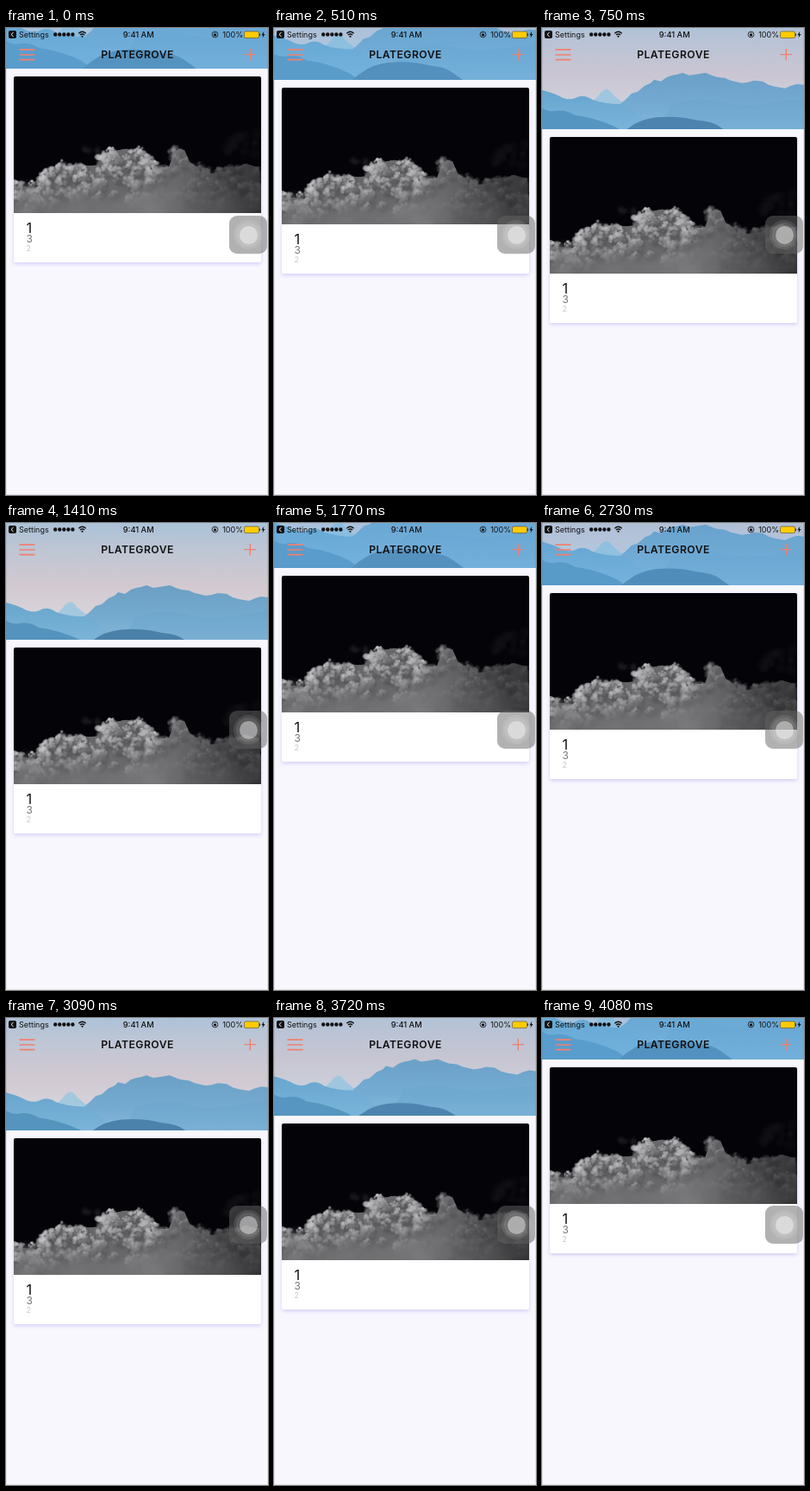
These frames come from a looping animation (304 by 540 pixels, 4.11 s). An HTML page with a canvas:

```html
<!DOCTYPE html>
<html lang="en">
<head>
<meta charset="utf-8">
<title>Stretching header</title>
<style>
  html, body { margin: 0; width: 100%; height: 100%; overflow: hidden; }
  body { position: relative; background: #f8f7fe; font-family: Inter, Roboto, sans-serif; }
  .header { position: absolute; left: 0; top: 0; width: 304px; height: 47px; overflow: hidden; }
  .scene { position: absolute; left: 0; bottom: -12px; display: block; }
  .tint { position: absolute; inset: 0; background: #62aae0; }
  .bar { position: absolute; left: 0; top: 0; }
  .lift { position: absolute; left: 0; top: 0; filter: drop-shadow(0 2px 2px rgba(112, 92, 225, .25)); }
  .card {
    position: absolute; left: 9px; top: 9px; width: 286.5px; height: 215px;
    background: #fff; border-radius: 2px; overflow: hidden;
  }
  .card canvas { display: block; width: 287px; height: 157.5px; }
  .card span { position: absolute; left: 14.5px; line-height: 1; }
  .one { top: 167px; font-size: 16.5px; color: #111; }
  .three { top: 181.5px; font-size: 12px; color: #777; }
  .two { top: 193.5px; font-size: 9px; color: #c9c9cc; }
  .touch {
    position: absolute; left: 259px; top: 217px; width: 44px; height: 44px;
    border-radius: 9px; background: rgba(100, 100, 100, .5);
  }
  .touch i { position: absolute; border-radius: 50%; background: rgba(255, 255, 255, .1); }
  .touch i:nth-child(1) { inset: 5px; }
  .touch i:nth-child(2) { inset: 8px; }
  .touch i:nth-child(3) { inset: 11.5px; background: rgba(255, 255, 255, .42); }
  .edge { position: absolute; inset: 0; border: 1px solid rgba(120, 120, 130, .18); border-top: 0; }
</style>
</head>
<body>
<div class="lift" id="lift">
  <div class="card">
    <canvas id="clouds" width="574" height="315"></canvas>
    <span class="one">1</span><span class="three">3</span><span class="two">2</span>
  </div>
</div>

<div class="header" id="header">
  <svg class="scene" id="scene" width="304" height="152" viewBox="0 -5 304 152">
    <defs>
      <linearGradient id="sky" x2="0" y2="1">
        <stop offset="0" stop-color="#a9c1d8"/>
        <stop offset=".25" stop-color="#c0c6d4"/>
        <stop offset=".5" stop-color="#d3c8d0"/>
        <stop offset=".7" stop-color="#d8d2d8"/>
      </linearGradient>
      <linearGradient id="far" x2="0" y2="1">
        <stop offset="0" stop-color="#6b9fc4"/>
        <stop offset=".5" stop-color="#76abd0"/>
        <stop offset="1" stop-color="#8abcdc"/>
      </linearGradient>
      <linearGradient id="left" x2="0" y2="1">
        <stop offset="0" stop-color="#68a5cd"/>
        <stop offset="1" stop-color="#80b8da"/>
      </linearGradient>
    </defs>
    <rect y="-5" width="304" height="152" fill="url(#sky)"/>
    <path d="M56 108L66 98Q75 85 82 97L98 110Z" fill="#a5c9de"/>
    <path d="M80 147L92 107L97 103L104 96L111 94L119 87L126 84L130 80L138 82L145 77L151 75L157 74L163 72L171 75L178 74L190 72L197 75L203 77L212 78L219 81L232 84L239 83L246 81L256 82L263 86L270 88L282 90L289 87L296 85L304 86V147Z" fill="url(#far)"/>
    <path d="M150 109Q180 98 206 105T258 108T304 102V147H130Z" fill="#659fc8" opacity=".3"/>
    <path d="M0 92Q13 95 24 101Q33 104 39 101Q48 96 58 103Q75 109 92 108Q110 116 140 147H0Z" fill="url(#left)"/>
    <path d="M0 113Q9 118 16 116Q27 114 38 121Q62 124 86 135L104 147H0Z" fill="#5493bd"/>
    <path d="M88 147Q96 138 102 135Q113 126 132 123.5Q158 121 181 127Q198 128 207 135L224 147Z" fill="#4a80a9"/>
  </svg>
  <div class="tint" id="tint"></div>
</div>

<svg class="bar" width="304" height="47" font-family="Inter, Roboto, sans-serif" fill="#111">
  <rect x="3" y="3" width="9" height="9" rx="2"/>
  <path d="M8.6 5L6 7.5L8.6 10" fill="none" stroke="#fff"/>
  <text x="15" y="11" font-size="9">Settings</text>
  <path d="M57.2 7.5H79" stroke="#111" stroke-width="4.4" stroke-linecap="round" stroke-dasharray="0 5.05"/>
  <g fill="none" stroke="#111" stroke-width="1.3">
    <path d="M84.3 6.2Q88.5 2.4 92.7 6.2M85.9 8.1Q88.5 5.8 91.1 8.1"/>
    <circle cx="242.5" cy="7.5" r="3.4" stroke-width=".8"/>
  </g>
  <circle cx="88.5" cy="9.8" r="1.1"/>
  <text x="153.7" y="11" font-size="9.3" font-weight="500" text-anchor="middle">9:41 AM</text>
  <rect x="241" y="7" width="3" height="2.3"/>
  <path d="M241.6 7.2V6.4a.9 .9 0 0 1 1.8 0v.8" fill="none" stroke="#111" stroke-width=".6"/>
  <text x="275" y="11" font-size="9" text-anchor="end">100%</text>
  <rect x="276.5" y="4" width="17" height="7.6" rx="1.5" fill="#fc0" stroke="#4d4933" stroke-width=".6"/>
  <path d="M294.4 6.4v2.8" stroke="#333"/>
  <path d="M299.4 3.8L296.4 8.2H298.2L297.5 11.5L300.5 7H298.7Z"/>
  <g stroke="#f0806e" stroke-width="1.7">
    <path d="M15.5 25.2h18M15.5 31h18M15.5 36.7h18"/>
    <path d="M276.5 30.6h13.5M283.3 24v13.4" stroke-width="1.4"/>
  </g>
  <text x="152.5" y="35.3" font-size="12.2" font-weight="600" letter-spacing=".45" text-anchor="middle">PLATEGROVE</text>
</svg>

<div class="touch"><i></i><i></i><i></i></div>
<div class="edge"></div>

<script>
const $ = id => document.getElementById(id);
const LOOP = 4110, REST = 46.5, PULL = 89;

let seed = 11;
const rand = () => (seed = seed * 16807 % 2147483647) / 2147483647;
const mix = (a, b, k) => a + (b - a) * Math.min(1, Math.max(0, k));

// Cloud skyline as x, y pairs in card units
const skyline = [0, 119, 12, 121, 22, 121, 30, 126, 36, 108, 44, 98, 57, 96, 67, 102,
  76, 94, 86, 97, 98, 96, 102, 83, 116, 80, 131, 77, 146, 82, 157, 92, 170, 99,
  181, 98, 184, 86, 191, 77, 199, 79, 203, 92, 214, 99, 218, 107, 234, 105, 255, 102,
  268, 94, 281, 98, 288, 98];

function topAt(x) {
  let i = 2;
  while (i < skyline.length - 2 && skyline[i] < x) i += 2;
  return mix(skyline[i - 1], skyline[i + 1], (x - skyline[i - 2]) / (skyline[i] - skyline[i - 2]));
}

function drawClouds() {
  const g = $('clouds').getContext('2d');
  const puff = (x, y, r, v, a) => {
    const rgb = `${v | 0},${v | 0},${v + 2 | 0}`;
    const p = g.createRadialGradient(x, y, 0, x, y, r);
    p.addColorStop(0, `rgba(${rgb},${a})`);
    p.addColorStop(.55, `rgba(${rgb},${a * .75})`);
    p.addColorStop(1, `rgba(${rgb},0)`);
    g.fillStyle = p;
    g.fillRect(x - r, y - r, r * 2, r * 2);
  };

  // A billow is a shaded ball of small puffs, lit from the upper left
  const billow = (x, y, r, light, dark, alpha) => {
    puff(x + r * .2, y + r * .3, r * 1.15, dark, alpha);
    for (let i = 0; i < 26; i++) {
      const angle = rand() * 6.283, d = Math.sqrt(rand()) * .85;
      const dx = Math.cos(angle) * d, dy = Math.sin(angle) * d;
      const lit = .45 - dx * .35 - dy * .65 + (rand() - .5) * .3;
      puff(x + dx * r, y + dy * r, r * (.18 + rand() * .24), mix(dark, light, lit), alpha * .75);
    }
  };

  g.scale(2, 2);
  g.fillStyle = '#040308';
  g.fillRect(0, 0, 287, 158);

  // Thin wisps above the bank
  for (let i = 0; i < 14; i++) {
    puff(82 + rand() * 16, 82 + rand() * 6, 3 + rand() * 3, 42, .18);
    puff(247 + rand() * 40, 66 + rand() * 24, 4 + rand() * 6, 40, .18);
  }

  const body = g.createLinearGradient(0, 0, 287, 0);
  body.addColorStop(0, '#646466');
  body.addColorStop(.65, '#6a6a6c');
  body.addColorStop(1, '#343437');
  g.beginPath();
  g.moveTo(0, 158);
  for (let x = 0; x <= 287; x += 3) g.lineTo(x, topAt(x) + 6);
  g.lineTo(287, 158);
  g.fillStyle = body;
  g.fill();

  const billows = Array.from({ length: 150 }, () => {
    const x = rand() * 287, k = rand() ** 1.3 * .75, r = 4 + rand() * 7;
    const top = topAt(x);
    return { x, k, r, y: top + r * .7 + k * (158 - top) };
  }).sort((a, b) => a.y - b.y);
  for (const { x, k, r, y } of billows) {
    const crisp = x < 165;
    const light = crisp ? mix(212, 128, k) : mix(mix(160, 82, (x - 195) / 60), 112, k);
    const dark = crisp ? mix(82, 95, k) : mix(88, 45, (x - 195) / 70);
    billow(x, y, r, light, dark, crisp ? .85 : .42);
  }

  // Soft fog along the bottom and across the right side
  for (let i = 0; i < 90; i++) {
    const x = rand() * 300, y = 136 + rand() * 24;
    const v = mix(118, 66, (x - 170) / 115) + (rand() - .5) * 44;
    puff(x, y, 10 + rand() * 14, v, .22);
  }
}

// Critically damped step from 0 to 1
function spring(t, tau) {
  const s = Math.max(0, t / tau);
  return 1 - (1 + s) * Math.exp(-s);
}

function headerHeight(t) {
  const pull = spring(t - 436, 107) - spring(t - 1473, 68)
             + spring(t - 2619, 107) - spring(t - 3656, 68);
  return REST + PULL * pull;
}

function frame(now) {
  const h = Math.round(headerHeight(now % LOOP));
  const closed = Math.max(0, 136 - h) / PULL;
  $('header').style.height = h + 'px';
  $('scene').style.transform = `translateY(${-10 * closed}px)`;
  $('lift').style.transform = `translateY(${h}px)`;
  $('tint').style.opacity = closed * .42;
  requestAnimationFrame(frame);
}

drawClouds();
frame(0);
</script>
</body>
</html>
```
